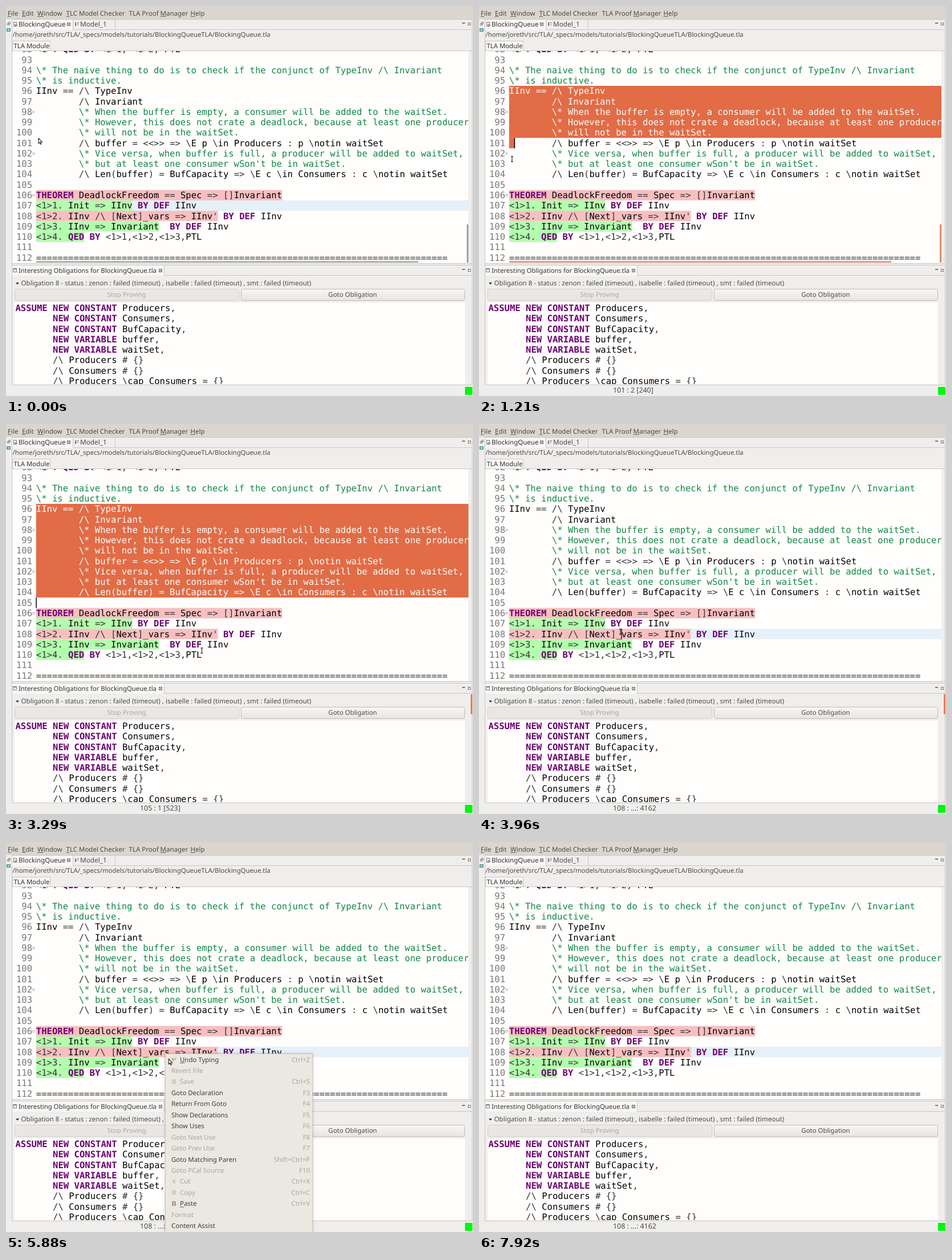
These frames come from a looping animation (819x684 px, 8 s). An HTML page with a canvas:

```html
<!DOCTYPE html>
<html lang="en">
<head>
<meta charset="utf-8">
<title>Proof editor</title>
<style>
html, body { margin: 0; width: 100%; height: 100%; overflow: hidden; background: #f0eeec; }
canvas { display: block; }
</style>
</head>
<body>
<canvas id="stage" width="819" height="684"></canvas>
<script>
const ctx = document.getElementById('stage').getContext('2d');
ctx.textRendering = 'geometricPrecision';

const LOOP = 8000, CHAR = 9.377, ROW = 18.26, LEFT = 52.8, RIGHT = 811;
const MONO = '"DejaVu Sans Mono", monospace', SANS = '"Noto Sans", sans-serif';
const INK = '#4a4a48', DIM = '#a9a6a2', EDGE = '#c9c6c2', ORANGE = '#e16c46', PAPER = '#fffefd';
const PINK = '#f8bfc0', GREEN = '#b3fdae';
const KEYWORDS = new Set('THEOREM BY DEF QED ASSUME NEW CONSTANT VARIABLE'.split(' '));

const FIRST = 92;
const code = String.raw`<1>. QED BY <1>1, <1>2, PTL

\* The naive thing to do is to check if the conjunct of TypeInv /\ Invariant
\* is inductive.
IInv == /\ TypeInv
        /\ Invariant
        \* When the buffer is empty, a consumer will be added to the waitSet.
        \* However, this does not crate a deadlock, because at least one producer
        \* will not be in the waitSet.
        /\ buffer = <<>> => \E p \in Producers : p \notin waitSet
        \* Vice versa, when buffer is full, a producer will be added to waitSet,
        \* but at least one consumer wSon't be in waitSet.
        /\ Len(buffer) = BufCapacity => \E c \in Consumers : c \notin waitSet

THEOREM DeadlockFreedom == Spec => []Invariant
<1>1. Init => IInv BY DEF IInv
<1>2. IInv /\ [Next]_vars => IInv' BY DEF IInv
<1>3. IInv => Invariant  BY DEF IInv
<1>4. QED BY <1>1,<1>2,<1>3,PTL
`.split('\n');
code.push('='.repeat(77));

const obligation = String.raw`ASSUME NEW CONSTANT Producers,
       NEW CONSTANT Consumers,
       NEW CONSTANT BufCapacity,
       NEW VARIABLE buffer,
       NEW VARIABLE waitSet,
       /\ Producers # {}
       /\ Consumers # {}
       /\ Producers \cap Consumers = {}`.split('\n');

// line, colour, columns covered
const marks = [[106, PINK, 46], [107, GREEN, 18], [108, PINK, 34], [109, GREEN, 23], [110, GREEN, 9]];

// label, shortcut, flags: d = disabled, i = icon, u = underlined first letter
const menuItems = [
  ['Undo Typing', 'Ctrl+Z', 'iu'], ['Revert File', '', 'd'], ['Save', 'Ctrl+S', 'di'],
  ['Goto Declaration', 'F3', ''], ['Return From Goto', 'F4', ''], ['Show Declarations', 'F5', ''],
  ['Show Uses', 'F6', ''], ['Goto Next Use', 'F8', 'd'], ['Goto Prev Use', 'F7', 'd'],
  ['Goto Matching Paren', 'Shift+Ctrl+P', ''], ['Goto PCal Source', 'F10', 'd'],
  ['Cut', 'Ctrl+X', 'di'], ['Copy', 'Ctrl+C', 'di'], ['Paste', 'Ctrl+V', 'iu'],
  ['Format', '', 'd'], ['Content Assist', '', '']
];

// pointer path: time, x, y
const path = [
  [0, 57, 232], [40, 57, 232], [460, 57, 149], [710, 57, 149], [920, 64.5, 217], [1130, 60, 257],
  [1460, 51.5, 303.5], [1750, 51, 300], [2080, 48, 307], [2540, 80, 450], [2840, 60, 575],
  [3330, 368, 382], [3540, 300, 374], [3750, 248, 364], [3960, 248, 364], [4540, 206, 432],
  [4960, 206, 432], [5250, 278, 366], [5670, 278, 371], [5880, 285, 380], [6380, 416, 635],
  [6630, 417, 664], [6830, 417, 690], [LOOP, 417, 690]
];

function rect(color, x, y, w, h) {
  ctx.fillStyle = color;
  ctx.fillRect(x, y, w, h);
}

function box(color, x, y, w, h) {
  ctx.strokeStyle = color;
  ctx.lineWidth = 1;
  ctx.strokeRect(x + .5, y + .5, w, h);
}

function write(s, x, y, size = 11.4, color = INK, align = 'left') {
  ctx.font = `${size}px ${SANS}`;
  ctx.textAlign = align;
  ctx.fillStyle = color;
  ctx.fillText(s, x, y);
}

function underline(s, x, y, before = '') {
  const start = x + ctx.measureText(before).width;
  rect(INK, start, y + 1.5, ctx.measureText(s).width, .8);
}

function mono(s, x, y, color, bold = '') {
  ctx.font = `${bold} 15.575px ${MONO}`;
  ctx.textAlign = 'left';
  ctx.fillStyle = color;
  ctx.fillText(s, x, y);
}

function codeLine(s, x, y, plain) {
  if (plain) return mono(s, x, y, plain);
  const comment = s.indexOf('\\*');
  if (comment >= 0) return mono(s.slice(comment), x + comment * CHAR, y, '#128744');
  for (const m of s.matchAll(/[A-Za-z_]\w*|[^A-Za-z_\s]+/g)) {
    const word = m[0], key = KEYWORDS.has(word);
    const color = key ? '#6b0070' : /^[A-Za-z_]/.test(word) ? '#000' : '#333';
    mono(word, x + m.index * CHAR, y, color, key ? 'bold' : '');
  }
}

function clipped(x, y, w, h, draw) {
  ctx.save();
  ctx.beginPath();
  ctx.rect(x, y, w, h);
  ctx.clip();
  draw();
  ctx.restore();
}

const lineTop = line => 140 + (line - 96) * ROW;

function windowButtons(y) {
  box('#777', 800, y, 4, 1);
  box('#777', 810, y, 4, 4);
}

function closeMark(x, y) {
  box('#777', x, y, 5, 5);
  ctx.beginPath();
  ctx.moveTo(x + 1, y + 1); ctx.lineTo(x + 5, y + 5);
  ctx.moveTo(x + 5, y + 1); ctx.lineTo(x + 1, y + 5);
  ctx.stroke();
}

function button(s, x, y, w, color) {
  const fill = ctx.createLinearGradient(0, y, 0, y + 21);
  fill.addColorStop(0, color === DIM ? '#ebe9e6' : '#f8f7f6');
  fill.addColorStop(1, color === DIM ? '#e8e6e3' : '#e7e4e1');
  ctx.fillStyle = fill;
  ctx.lineWidth = 1;
  ctx.beginPath();
  ctx.roundRect(x + .5, y + .5, w, 20, 3);
  ctx.fill();
  ctx.strokeStyle = color === DIM ? '#d2cfcb' : '#bfbbb7';
  ctx.stroke();
  write(s, x + w / 2, y + 14.3, 11.4, color, 'center');
}

function drawChrome() {
  rect('#f0eeec', 0, 0, 819, 684);
  rect('#dad6cf', 0, 0, 819, 23);
  const items = [['File', 3], ['Edit', 28], ['Window', 55], ['TLC Model Checker', 105.5], ['TLA Proof Manager', 215.5, 'TLA Proof '], ['Help', 323.5]];
  for (const [s, x, before = ''] of items) {
    write(s, x, 16.6, 11.5);
    underline(s[before.length], x, 16.6, before);
  }

  // left strip
  box('#888', 2, 30, 3, 3);
  box('#888', 4, 28, 3, 3);
  rect('#5f9ea0', 1, 39, 7, 6);
  rect('#d5e6e6', 3, 41, 3, 2);
  rect(EDGE, 10, 23, 1, 641);

  // editor tabs
  rect('#f8f7f6', 11, 24, 106, 18);
  rect(EDGE, 11, 23, 806, 1);
  rect(EDGE, 117, 24, 1, 17);
  rect(EDGE, 191, 24, 1, 17);
  rect(EDGE, 117, 41, 700, 1);
  box('#697d92', 13, 28, 5, 7);
  rect('#c49a50', 15, 32, 5, 3);
  write('BlockingQueue', 22, 35.6, 11.5, '#333');
  closeMark(107, 29);
  rect('#567a9b', 121, 29, 2, 6);
  rect('#567a9b', 124, 29, 4, 1);
  rect('#c49a50', 124, 32, 4, 1);
  write('Model_1', 130, 35.6, 11.8);
  windowButtons(29);
  write('/home/joreth/src/TLA/_specs/models/tutorials/BlockingQueueTLA/BlockingQueue.tla', 11.5, 54.1, 11.35);
  rect(EDGE, 78, 78, 739, 1);
  rect('#f8f7f6', 11, 61, 67, 18);
  box(EDGE, 11, 61, 66, 17);
  write('TLA Module', 13.5, 73.6, 11.35, '#333');

  // lower pane
  rect(EDGE, 11, 451, 807, 1);
  rect(EDGE, 11, 454, 807, 1);
  rect('#f8f7f6', 11, 455, 266, 18);
  rect(EDGE, 277, 455, 1, 17);
  rect(EDGE, 277, 472, 540, 1);
  rect(EDGE, 817, 23, 1, 641);
  box('#697d92', 12, 460, 6, 6);
  rect('#697d92', 12, 460, 7, 2);
  write('Interesting Obligations for BlockingQueue.tla', 22, 467.6, 11.35, '#333');
  closeMark(268, 461);
  windowButtons(461);
  ctx.fillStyle = '#333';
  ctx.beginPath();
  ctx.moveTo(17, 485); ctx.lineTo(23, 485); ctx.lineTo(20, 488.5);
  ctx.fill();
  write('Obligation 8 - status : zenon : failed (timeout) , isabelle : failed (timeout) , smt : failed (timeout)', 26.5, 490.4, 11.6);
  button('Stop Proving', 15, 496, 393, DIM);
  button('Goto Obligation', 412, 496, 392, INK);
  rect(PAPER, 15, 520, 790, 144);
  clipped(15, 520, 790, 143, () =>
    obligation.forEach((s, i) => codeLine(s, 16.4, 535 + i * ROW)));
  rect(EDGE, 11, 664, 807, 1);
  rect('#00f60a', 805, 668, 13, 14);
}

// Caret position of the running selection
function selection(t) {
  if (t < 710 || t >= 3960) return null;
  const line = t < 920 ? 96 + (t - 710) / 105 : Math.min(105, 98 + (t - 920) / 540 * 7);
  const row = Math.floor(line), col = row < 105 ? 1 : 0;
  let count = col;
  for (let n = 96; n < row; n++) count += code[n - FIRST].length + 1;
  return { row, col, count };
}

function drawEditor(t, sel) {
  rect(PAPER, 11, 79, RIGHT - 11, 372);
  clipped(11, 79, RIGHT - 11, 372, () => {
    if (!sel) rect('#e5f0f9', LEFT, lineTop(t < 710 ? 107 : 108), RIGHT, ROW);
    for (const [line, color, cols] of marks) rect(color, LEFT, lineTop(line), cols * CHAR, ROW);
    if (sel) {
      rect(ORANGE, LEFT, lineTop(96), RIGHT, (sel.row - 96) * ROW);
      rect(ORANGE, LEFT, lineTop(sel.row), sel.col * CHAR, ROW);
    }
    code.forEach((s, i) => {
      const line = FIRST + i, y = lineTop(line) + 14.4;
      const chosen = sel && line >= 96 && line < sel.row;
      mono(String(line).padStart(3), 18, y, '#787878');
      codeLine(s, LEFT, y, chosen && '#fff');
      if ([98, 102, 106].includes(line)) {
        ctx.strokeStyle = '#a9b4bd';
        ctx.lineWidth = .8;
        ctx.beginPath();
        ctx.arc(48.3, y - 5, 2, 0, 7);
        ctx.moveTo(47, y - 5); ctx.lineTo(49.6, y - 5);
        ctx.stroke();
      }
    });
    if (sel) rect('#000', LEFT + sel.col * CHAR - .5, lineTop(sel.row), 1.5, ROW);
    else if (t >= 3960 && t < 5460) rect('#000', LEFT + 21 * CHAR - .4, lineTop(108), 1.3, ROW);

    if (t < 2900 || t >= 4300 && t < 5460) {
      const color = t < 710 ? '#a5a3a1' : '#e28a6c';
      rect(color, 808, 383, 3, 67);
      rect(color, 53, 447.5, 670, 2.5);
    }
  });
  if (t >= 2540 && t < 4300) rect('#e27b58', 815, 474, 3, 35);
}

function drawStatus(t, sel) {
  if (t < 710) return;
  write(sel ? `${sel.row} : ${sel.col + 1} [${sel.count}]` : '108 : ...: 4162', 235, 678, 12.4);
}

function menuIcon(i, y) {
  const color = i === 0 ? '#c49a50' : i === 13 ? '#8a7656' : '#bdbab5';
  ctx.strokeStyle = color;
  ctx.lineWidth = 1.2;
  ctx.beginPath();
  if (i === 0) {
    ctx.moveTo(294, y - 3); ctx.lineTo(291, y); ctx.lineTo(294, y + 3);
    ctx.moveTo(291, y); ctx.lineTo(297, y); ctx.lineTo(298, y - 3);
  } else if (i === 11) {
    ctx.moveTo(292, y - 3); ctx.lineTo(297, y + 3);
    ctx.moveTo(297, y - 3); ctx.lineTo(293, y + 3);
  } else {
    ctx.rect(292, y - 3, 5, 6);
    ctx.moveTo(293, y); ctx.lineTo(296, y);
  }
  ctx.stroke();
}

function drawMenu(t) {
  if (t < 5670 || t >= 7920) return;
  ctx.save();
  ctx.shadowColor = 'rgba(0,0,0,.25)';
  ctx.shadowBlur = 4;
  rect('#ebe7e1', 279, 371, 259, 320);
  ctx.restore();
  box('#cdc9c3', 279, 371, 258, 320);
  menuItems.forEach(([label, shortcut, flags], i) => {
    const y = 381.3 + i * 19.45, hot = i === 15 && t >= 6830 && t < 6960;
    if (hot) rect(ORANGE, 280, y - 9.5, 257, 19.5);
    const x = flags.includes('i') ? 305 : 290;
    write(label, x, y + 4.2, 11.45, hot ? '#fff' : flags.includes('d') ? DIM : '#3f3f3d');
    if (flags.includes('u')) underline(label[0], x, y + 4.2);
    if (x === 305) menuIcon(i, y);
    write(shortcut, 533, y + 4.2, 11.45, DIM, 'right');
  });
  if (t >= 7130) {
    rect('#ebe7e1', 537, 681, 229, 3);
    rect('#cdc9c3', 537, 681, 229, 1);
  }
}

function drawPointer(t) {
  const i = path.findIndex(p => p[0] > t);
  const [t0, x0, y0] = path[i - 1], [t1, x1, y1] = path[i];
  const k = (t - t0) / (t1 - t0);
  const x = x0 + (x1 - x0) * k, y = y0 + (y1 - y0) * k;
  const beam = t > 300 && t < 1750 || t >= 1750 && t < 5460 && x > 53 && y < 451;
  ctx.beginPath();
  if (beam) {
    ctx.moveTo(x - 2, y - 4.5); ctx.lineTo(x + 2, y - 4.5);
    ctx.moveTo(x, y - 4.5); ctx.lineTo(x, y + 4.5);
    ctx.moveTo(x - 2, y + 4.5); ctx.lineTo(x + 2, y + 4.5);
  } else {
    const shape = [[0, 0], [0, 9], [2, 7.2], [3.6, 10.5], [5, 9.8], [3.6, 6.7], [6.3, 6.5]];
    for (const [dx, dy] of shape) ctx.lineTo(x + dx, y + dy);
    ctx.closePath();
    ctx.fillStyle = '#fff';
    ctx.fill();
  }
  ctx.strokeStyle = '#222';
  ctx.lineWidth = 1.1;
  ctx.stroke();
}

const began = performance.now();
function frame() {
  const t = (performance.now() - began) % LOOP;
  const sel = selection(t);
  drawChrome();
  drawEditor(t, sel);
  drawStatus(t, sel);
  drawMenu(t);
  drawPointer(t);
  requestAnimationFrame(frame);
}
frame();
</script>
</body>
</html>
```
